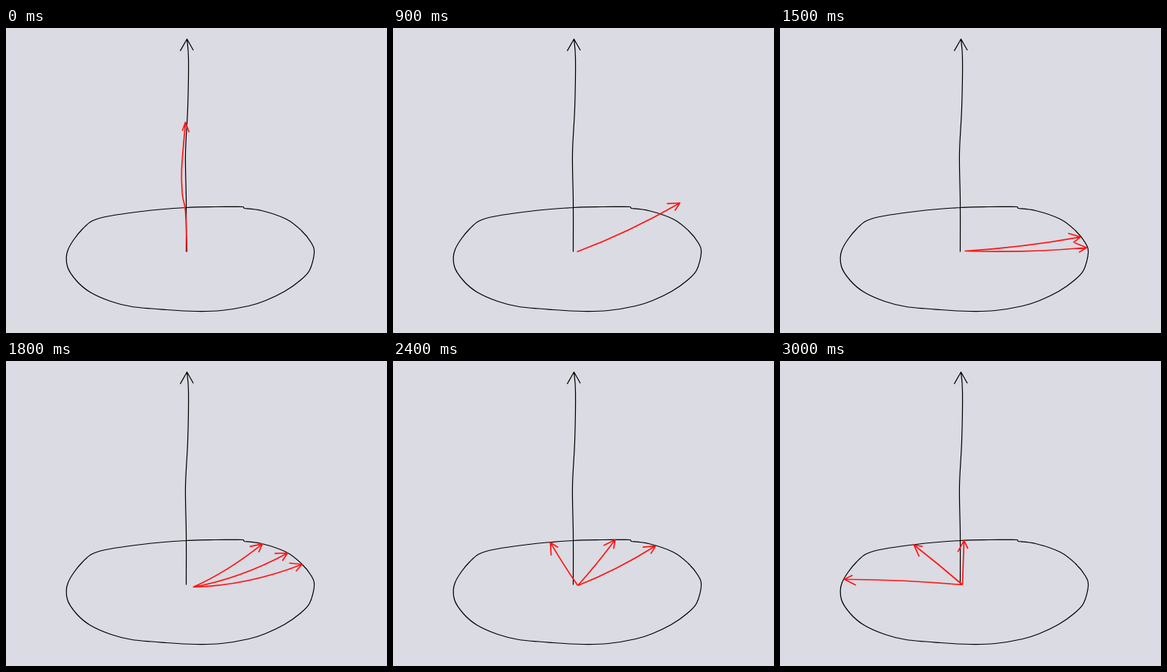
These frames come from a looping animation (500 px wide and 400 px high, 3.15 s). An HTML page:

```html
<!DOCTYPE html>
<html lang="en">
<head>
<meta charset="utf-8">
<title>Rotating arrows</title>
<style>
html, body { margin: 0; width: 100%; height: 100%; overflow: hidden; background: #dbdbe3; }
svg { display: block; width: 100vw; height: 100vh; }
path { fill: none; stroke-linejoin: round; }
#ink { stroke: #000; stroke-width: 1.2; }
#red { stroke: #fe1818; stroke-width: 1.7; }
</style>
</head>
<body>
<svg viewBox="0 0 500 400">
  <g transform="translate(.5 .5)">
    <path id="ink"/>
    <path id="red"/>
  </g>
</svg>
<script>
const LOOP = 3150, STEP = 150;
const ink = document.getElementById("ink");
const red = document.getElementById("red");

const points = text => text.split(" ").map(p => p.split(",").map(Number));
const mix = (a, b, k) => a + (b - a) * k;
const fmt = n => n.toFixed(1);

// Smooth open curve through a few points.
function curve(pts) {
  let d = `M${pts[0]}`;
  for (let i = 0; i < pts.length - 1; i++) {
    const a = pts[i], b = pts[i + 1];
    const before = pts[i - 1] || a, after = pts[i + 2] || b;
    const c1 = a.map((v, j) => fmt(v + (b[j] - before[j]) / 6));
    const c2 = b.map((v, j) => fmt(v - (after[j] - a[j]) / 6));
    d += `C${c1} ${c2} ${b}`;
  }
  return d;
}

// Arrow head whose barbs turn away from the backward direction.
function head([x, y], back, long, short, spread = 0.47) {
  const barb = (size, turn) =>
    `${fmt(x + size * Math.cos(back + turn))},${fmt(y + size * Math.sin(back + turn))}`;
  return `M${barb(long, spread)}L${x},${y} ${barb(short, -spread)}`;
}

// Shaft that sags in proportion to its width.
function arrow([ox, oy], [x, y], bend) {
  const cy = (oy + y) / 2 + 2 * bend * Math.abs(x - ox);
  const back = Math.atan2(cy - y, (ox - x) / 2);
  return `M${ox},${oy}Q${fmt((ox + x) / 2)},${fmt(cy)} ${x},${y}` + head([x, y], back, 17, 12);
}

// The ring, clockwise from the small gap at the top.
const rim = points("312,236 335,239 367,250 387,265 400,281 404,294 398,317 385,331 365,345 " +
  "340,357 318,364 282,370 248,371 210,369 165,365 137,358 110,346 92,331 80,312 81,290 " +
  "100,263 122,249 178,240 236,235 274,234 311,234");
const axis = points("236,293 236,225 235,165 238,105 239,40 237,14");

ink.setAttribute("d", curve(rim) + "Z" + curve(axis) + head([237, 14], Math.PI / 2, 18, 17, 0.52));

// Point on the far side of the ring at a given x.
function onRim(x) {
  for (let i = 0; i < rim.length; i++) {
    const a = rim[i], b = rim[(i + 1) % rim.length];
    if (Math.min(a[1], b[1]) < 295 && (x - a[0]) * (x - b[0]) <= 0) {
      return [x, mix(a[1], b[1], (x - a[0]) / (b[0] - a[0]))];
    }
  }
  return [x, 294];
}

const upright = curve(points("237,293 235,240 231,218 230,185 235,123")) +
  head([235, 123], Math.PI / 2, 12, 14, 0.35);

// The single arrow falls onto the ring.
const fall = points("283,153 325,183 376,229 402,285");

// The arrow then fans out into three, which sweep round the ring.
const sweep = [
  { t: 1500, from: [242, 292], tips: [402, 394, 394], bend: 0.015 },
  { t: 1800, from: [245, 296], tips: [388, 369, 336], bend: 0.045 },
  { t: 2100, from: [244, 297], tips: [368, 337, 272], bend: 0 },
  { t: 2400, from: [242, 294], tips: [344, 291, 206], bend: 0.03 },
  { t: 2700, from: [240, 291], tips: [291, 244, 142], bend: 0.045 },
  { t: 3000, from: [239, 293], tips: [241, 175, 84], bend: -0.01 }
];

function fan(t) {
  const a = sweep.findLast(p => p.t <= t);
  const b = sweep.find(p => p.t > t) || a;
  const k = a === b ? 0 : (t - a.t) / (b.t - a.t);
  const from = a.from.map((v, i) => mix(v, b.from[i], k));
  return a.tips
    .map((x, i) => arrow(from, onRim(mix(x, b.tips[i], k)), mix(a.bend, b.bend, k)))
    .join("");
}

function pose(t) {
  if (t < 600) return upright;
  if (t < 1500) return arrow([241, 293], fall[Math.min((t - 600) / STEP, 3)], 0.025);
  return fan(t);
}

function tick() {
  const t = performance.now() % LOOP;
  red.setAttribute("d", pose(Math.floor(t / STEP) * STEP));
  requestAnimationFrame(tick);
}
tick();
</script>
</body>
</html>
```
